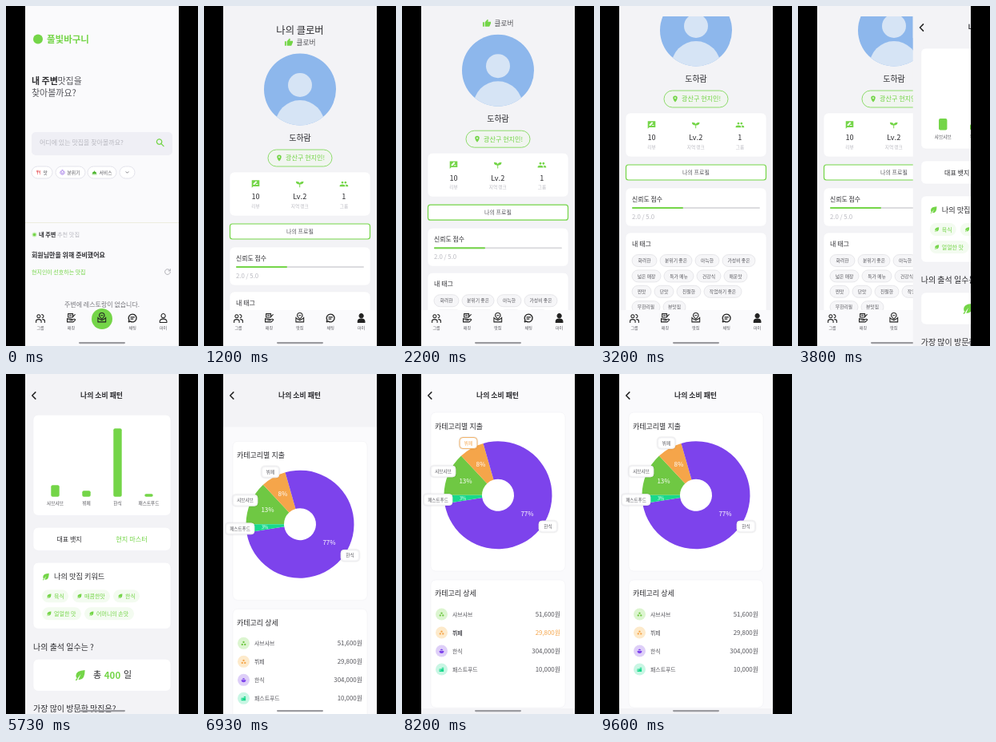
An HTML page with a canvas for the animation above (9.67 s loop, 240x426 px).

```html
<!DOCTYPE html>
<html lang="ko">
<head>
<meta charset="utf-8">
<style>
html, body { margin: 0; height: 100%; overflow: hidden; background: #000; }
canvas { display: block; }
</style>
</head>
<body>
<canvas id="stage" width="240" height="426"></canvas>
<script>
const ctx = document.getElementById('stage').getContext('2d');
const LOOP = 9670;
const GREEN = '#74d548', INK = '#2c2c30', GREY = '#b9b9c0', DARK = '#55555b';
const PAGE = '#f3f3f6', PALE = '#fafafc';

// Icons live in a 24 x 24 box.
const ICONS = {
  group: 'M8 4a3.7 3.7 0 1 0 .1 0M2 22v-3q0-4 6-4t6 4v3M15 4a3.7 3.7 0 0 1 1 7.4M17 15q5 0 5 4v3',
  match: 'M5 2h11v8H5zM8 6h5M3 13v8h14l5-5q-2-3-5-1l-3 2M3 14h8q4 0 3 3H9M16 9l5-5',
  mail: 'M3 10v11h18V10M3 12l9 5 9-5M12 14q-6-5-6-8a6 6 0 0 1 12 0q0 3-6 8M10 6h4',
  chat: 'M12 3a9 9 0 1 1-5 16.5L3 21l1-4.5A9 9 0 0 1 12 3M8 10h8M8 14h5',
  me: 'M12 2a4.8 4.8 0 1 0 .1 0M4 22v-2q0-6 8-6t8 6v2z',
  search: 'M10 3a7 7 0 1 0 .1 0M15 15l7 7',
  down: 'M6 9l6 6 6-6',
  back: 'M16 3l-9 9 9 9',
  refresh: 'M20 8A9 9 0 1 0 21 13M21 3v6h-6',
  people: 'M8 5a3 3 0 1 0 .1 0M16 5a3 3 0 1 0 .1 0M1 19v-2q0-4 7-4t7 4v2zM17 19v-3l-1-3q7 0 7 4v2z',
  thumb: 'M1 9h4v12H1zM7 9l7-8 2 2-1 5h8v4l-4 9H7z',
  pin: 'M12 2a7 7 0 0 0-7 7q0 5 7 13 7-8 7-13a7 7 0 0 0-7-7M12 6.5a2.5 2.5 0 1 1-.1 0z',
  review: 'M2 2h20v16H6l-4 4zM6 14h3l7-7-3-3-7 7zM12 14h6v-2h-4z',
  sprout: 'M11 21V13Q2 13 2 5q8 0 10 5 2-5 10-5 0 8-9 8v8z',
  leaf: 'M21 2Q3 3 3 13q0 4 3 6l7-9-5 11q13 2 13-19M5 18l-3 4 2 1 3-4z',
  fork: 'M4 2v7q0 3 3 3v10h2V12q3 0 3-3V2h-2v6H9V2H7v6H6V2zM20 2q-5 2-5 11h3v9h2z',
  face: 'M12 2a10 10 0 1 0 .1 0M8 9v1M16 9v1M7 14q5 6 10 0',
  bell: 'M2 18q0-10 9-11V4h2v3q9 1 9 11zM1 20h22v2H1z',
  dots: 'M12 3a4 4 0 1 0 .1 0M6 13a4 4 0 1 0 .1 0M18 13a4 4 0 1 0 .1 0z',
  bowl: 'M2 12h20q0 10-10 10T2 12M5 9q7-11 14 0z',
  shop: 'M2 10h11V4h8v18H2zM5 13v5h3v-5zM15 7v3h4V7z'
};
for (const name in ICONS) ICONS[name] = new Path2D(ICONS[name]);

function icon(name, x, y, size, color, lineWidth = 0) {
  ctx.save();
  ctx.translate(x - size / 2, y - size / 2);
  ctx.scale(size / 24, size / 24);
  ctx.lineCap = ctx.lineJoin = 'round';
  if (lineWidth) {
    ctx.strokeStyle = color;
    ctx.lineWidth = lineWidth;
    ctx.stroke(ICONS[name]);
  } else {
    ctx.fillStyle = color;
    ctx.fill(ICONS[name], 'evenodd');
  }
  ctx.restore();
}

// y is the visual middle of the line.
function text(str, x, y, size, color = INK, align = 'left', weight = 400) {
  ctx.font = `${weight} ${size}px "Noto Sans CJK KR", "Noto Sans CJK", sans-serif`;
  ctx.textAlign = align;
  ctx.fillStyle = color;
  ctx.fillText(str, x, y + size * 0.37);
}
const mid = (str, x, y, size, color, weight) => text(str, x, y, size, color, 'center', weight);

function box(x1, y1, x2, y2, radius, fill, border, lineWidth = 0.8) {
  ctx.beginPath();
  ctx.roundRect(x1, y1, x2 - x1, y2 - y1, radius);
  if (fill) { ctx.fillStyle = fill; ctx.fill(); }
  if (border) { ctx.strokeStyle = border; ctx.lineWidth = lineWidth; ctx.stroke(); }
}
const card = (y1, y2, x1 = 34, x2 = 206) => box(x1, y1, x2, y2, 6, '#fff', '#ececf1', 0.5);

function disc(x, y, r, fill) {
  ctx.beginPath();
  ctx.arc(x, y, r, 0, 7);
  ctx.fillStyle = fill;
  ctx.fill();
}

function fillPage(color, top = 0, bottom = 426) {
  ctx.fillStyle = color;
  ctx.fillRect(24, top, 192, bottom - top);
}

function scrolled(top, offset, draw) {
  ctx.save();
  ctx.beginPath();
  ctx.rect(24, top, 192, 426 - top);
  ctx.clip();
  ctx.translate(0, -offset);
  draw();
  ctx.restore();
}

const homeBar = () => box(91, 421, 149, 423.2, 1.1, '#9b9ba0');

function navBar(home) {
  fillPage(PALE, 381);
  if (home) disc(120, 392, 13, GREEN);
  ['group', 'match', 'mail', 'chat', 'me'].forEach((name, i) => {
    const x = 43 + i * 38.4, label = ['그룹', '매칭', '맛집', '채팅', '마이'][i];
    if (name === 'me' && !home) icon(name, x, 391, 13, '#222');
    icon(name, x, 391, 13, '#222', name === 'chat' ? 2.6 : 2);
    if (!home || i !== 2) mid(label, x, 403.5, 5, DARK);
  });
  homeBar();
}

function homePage() {
  fillPage(PALE);
  disc(40, 41.5, 6, GREEN);
  text('풀빛바구니', 51, 42, 11.5, GREEN, 'left', 700);
  text('내 주변', 32, 94, 11, INK, 'left', 700);
  text('맛집을', 64.5, 94, 11, DARK);
  text('찾아볼까요?', 32, 109, 11, DARK);
  box(32, 158, 208, 187, 5, '#efeff5');
  text('어디에 있는 맛집을 찾아볼까요?', 42, 171.5, 8, GREY);
  icon('search', 192.5, 171, 11, GREEN, 2.8);

  [[32, 58, '맛', 'fork', '#e5484d'], [62, 99, '분위기', 'face', '#8752e0'],
   [102, 138, '서비스', 'bell', '#4cb52d']].forEach(([x1, x2, label, name, color]) => {
    box(x1, 201, x2, 216, 7.5, '#fff', '#dedee6');
    icon(name, x1 + 8.5, 208.5, 6.5, color, name === 'face' ? 2.5 : 0);
    text(label, x1 + 14.5, 208.5, 5.8, DARK);
  });
  box(142, 201, 161, 216, 7.5, '#fff', '#dedee6');
  icon('down', 151.5, 208.5, 6, DARK, 3);

  ctx.fillStyle = '#ededdf';
  ctx.fillRect(24, 271, 192, 1);
  disc(35.5, 286.5, 3, '#c9f0b8');
  disc(35.5, 286.5, 1.8, GREEN);
  text('내 주변', 41, 286.5, 7.2, INK, 'left', 700);
  text('추천 맛집', 64, 286.5, 7.2, GREY);
  text('회원님만을 위해 준비했어요', 32, 312, 8, INK, 'left', 700);
  text('현지인이 선호하는 맛집', 32, 333, 7, GREEN);
  icon('refresh', 202, 333, 9, '#9a9aa0', 2);
  mid('주변에 레스토랑이 없습니다.', 120, 374.5, 8, '#77777d');
  navBar(true);
}

function avatar() {
  ctx.save();
  ctx.beginPath();
  ctx.arc(120, 104.5, 45, 0, 7);
  ctx.clip();
  ctx.fillStyle = '#8db7ec';
  ctx.fillRect(75, 59, 90, 91);
  disc(120, 99, 15, '#d6e4f5');
  ctx.beginPath();
  ctx.ellipse(120, 150, 31, 32, 0, 0, 7);
  ctx.fill();
  ctx.restore();
}

const TAGS = [
  [[40, 71, '화려한'], [75, 115, '분위기 좋은'], [119, 149, '아늑한'], [153, 194, '가성비 좋은']],
  [[40, 76, '넓은 매장'], [80, 117, '특가 메뉴'], [121, 151, '건강식'], [155, 184, '매운맛']],
  [[40, 64, '찐맛'], [68, 92, '단맛'], [96, 126, '친절한'], [130, 177, '작업하기 좋은']],
  [[40, 75, '무한리필'], [79, 107, '뷰맛집']]
];

function profilePage(offset) {
  fillPage(PAGE);
  scrolled(13, offset, () => {
    mid('나의 클로버', 120, 30, 12.3, INK, 500);
    icon('thumb', 106, 45.5, 11, GREEN);
    text('클로버', 115.5, 46, 8.7, DARK);
    avatar();
    mid('도하람', 120, 165, 10, INK, 500);
    box(80, 180, 160, 201, 10.5, '#f1f5f0', '#8edc6c', 1);
    icon('pin', 94, 190.5, 9.5, GREEN);
    text('광산구 현지인!', 102, 190.5, 8.1, GREEN);

    card(208, 263, 32, 208);
    [['review', '10', '리뷰'], ['sprout', 'Lv.2', '지역 랭크'], ['people', '1', '그룹']].forEach(([name, value, label], i) => {
      const x = 64.5 + i * 55.2;
      icon(name, x, 223, 11.5, GREEN);
      mid(value, x, 239, 9.2, INK, 500);
      mid(label, x, 251, 5.6, GREY);
    });

    box(32.5, 273, 207.5, 292, 3, '#fff', GREEN, 1.2);
    mid('나의 프로필', 120, 282.5, 7, DARK);
    card(302, 350, 32, 208);
    text('신뢰도 점수', 40, 316, 7.9, INK, 'left', 500);
    box(40, 326, 200, 328, 1, '#dcdcdf');
    box(40, 326, 104, 328, 1, GREEN);
    text('2.0 / 5.0', 40, 338, 7.8, GREY);

    card(358, 480, 32, 208);
    text('내 태그', 40, 372, 8, INK, 'left', 500);
    TAGS.forEach((row, i) => row.forEach(([x1, x2, label]) => {
      const y = 393 + i * 19.4;
      box(x1, y - 7.5, x2, y + 7.5, 7.5, '#f6f6f8', '#dedee3', 0.7);
      mid(label, (x1 + x2) / 2, y, 5.8, DARK);
    }));
  });
  navBar(false);
}

const SPENDING = [
  { name: '샤브샤브', won: 51600, color: '#6fc843', soft: '#dcf5d0', icon: 'dots', badge: [36, 67, 122], label: [79.5, 134, 8] },
  { name: '뷔페', won: 29800, color: '#f5a54a', soft: '#fdeacb', icon: 'dots', badge: [72, 94, 86.5], label: [98.5, 113.5, 8] },
  { name: '한식', won: 304000, color: '#7d43ec', soft: '#decff8', icon: 'bowl', badge: [171, 194, 191], label: [156.5, 175, 8] },
  { name: '패스트푸드', won: 10000, color: '#18d98c', soft: '#c9f6e4', icon: 'shop', badge: [27, 63, 157.5], label: [76, 155.5, 5.5] }
];
const TOTAL = SPENDING.reduce((sum, s) => sum + s.won, 0);

function spendingSection(selected) {
  fillPage(PALE, 30, 419);
  card(48, 247, 36, 204);
  card(258, 418, 36, 204);
  text('카테고리별 지출', 41, 65.5, 9, INK, 'left', 500);
  let angle = Math.PI;
  for (const s of SPENDING) {
    const next = angle + s.won / TOTAL * Math.PI * 2;
    ctx.beginPath();
    ctx.arc(120, 151.8, 67.5, angle, next);
    ctx.arc(120, 151.8, 20, next, angle, true);
    ctx.fillStyle = s.color;
    ctx.fill();
    angle = next;
  }
  text('카테고리 상세', 41, 275, 9, INK, 'left', 500);
  SPENDING.forEach((s, i) => {
    const active = s.name === selected, y = 301 + i * 23;
    const [x1, x2, by] = s.badge, [lx, ly, size] = s.label;
    mid(Math.round(s.won / TOTAL * 100) + '%', lx, ly, size, '#fff');
    ctx.save();
    ctx.shadowColor = '#0002';
    ctx.shadowBlur = 2;
    box(x1, by - 7, x2, by + 7, 4, '#fff', active ? s.color : '#f0f0f4');
    ctx.restore();
    mid(s.name, (x1 + x2) / 2, by, 5.6, active ? s.color : DARK);

    disc(49.5, y, 7.5, s.soft);
    icon(s.icon, 49.5, y, 7, s.color);
    text(s.name, 63, y, 6.9, DARK, 'left', active ? 700 : 400);
    text(s.won.toLocaleString('en-US') + '원', 198, y, 7.9, active ? s.color : DARK, 'right');
  });
}

const SECTION_TOP = 430;

function patternPage(offset, selected) {
  fillPage(PAGE);
  scrolled(40, offset, () => {
    card(53, 179);
    [['샤브샤브', 14.5], ['뷔페', 7.5], ['한식', 85.5], ['패스트푸드', 3.5]].forEach(([label, h], i) => {
      const x = 61.5 + i * 39;
      box(x - 5.2, 155.5 - h, x + 5.2, 155.5, Math.min(2, h / 2), GREEN);
      mid(label, x, 163.8, 5.7, DARK);
    });

    card(194, 223);
    mid('대표 뱃지', 79, 209, 8, INK);
    mid('현지 마스터', 157, 209, 8.2, GREEN);

    card(238, 321);
    icon('leaf', 50, 255.5, 10, GREEN);
    text('나의 맛집 키워드', 60, 255.5, 9.2, INK);
    [[45, 78, 280, '육식'], [83, 130, 280, '매콤한맛'], [134, 167, 280, '한식'],
     [45, 94, 302, '얼얼한 맛'], [98, 160, 302, '어머니의 손맛']].forEach(([x1, x2, y, label]) => {
      box(x1, y - 8, x2, y + 8, 8, '#f3fbf0');
      icon('leaf', x1 + 9, y, 6.5, GREEN);
      text(label, x1 + 15, y, 7, GREEN);
    });

    text('나의 출석 일수는 ?', 34, 343.5, 10, INK);
    card(359, 399);
    icon('leaf', 93, 379, 15, GREEN);
    text('총', 109, 379, 11, INK, 'left', 500);
    mid('400', 133, 379, 11.5, GREEN, 700);
    text('일', 147, 379, 11, INK, 'left', 500);
    text('가장 많이 방문한 맛집은?', 34, 421, 10, INK);
    ctx.translate(0, SECTION_TOP);
    spendingSection(selected);
  });
  fillPage(offset > SECTION_TOP - 20 ? PALE : PAGE, 0, 40);
  icon('back', 35, 27, 11, '#222', 3.2);
  mid('나의 소비 패턴', 119.5, 27, 8.9, INK, 700);
  homeBar();
}

const progress = (t, start, length) => Math.min(1, Math.max(0, (t - start) / length));
const easeInOut = u => u < 0.5 ? 2 * u * u : 1 - 2 * (1 - u) ** 2;
const easeOut = u => 1 - (1 - u) ** 3;

function render(now) {
  const t = now % LOOP;
  ctx.fillStyle = '#000';
  ctx.fillRect(0, 0, 240, 426);
  ctx.save();
  ctx.beginPath();
  ctx.rect(24, 0, 192, 426);
  ctx.clip();
  const slide = easeOut(progress(t, 3750, 350));
  if (t < 800) homePage();
  else if (slide < 1) profilePage(74 * easeInOut(progress(t, 1800, 1000)));
  if (slide > 0) {
    ctx.translate(192 * (1 - slide), 0);
    patternPage(SECTION_TOP * easeInOut(progress(t, 5660, 1600)), t > 7900 && t < 8700 ? '뷔페' : '');
  }
  ctx.restore();
}

const start = performance.now();
function tick() {
  render(performance.now() - start);
  requestAnimationFrame(tick);
}
tick();
</script>
</body>
</html>
```
